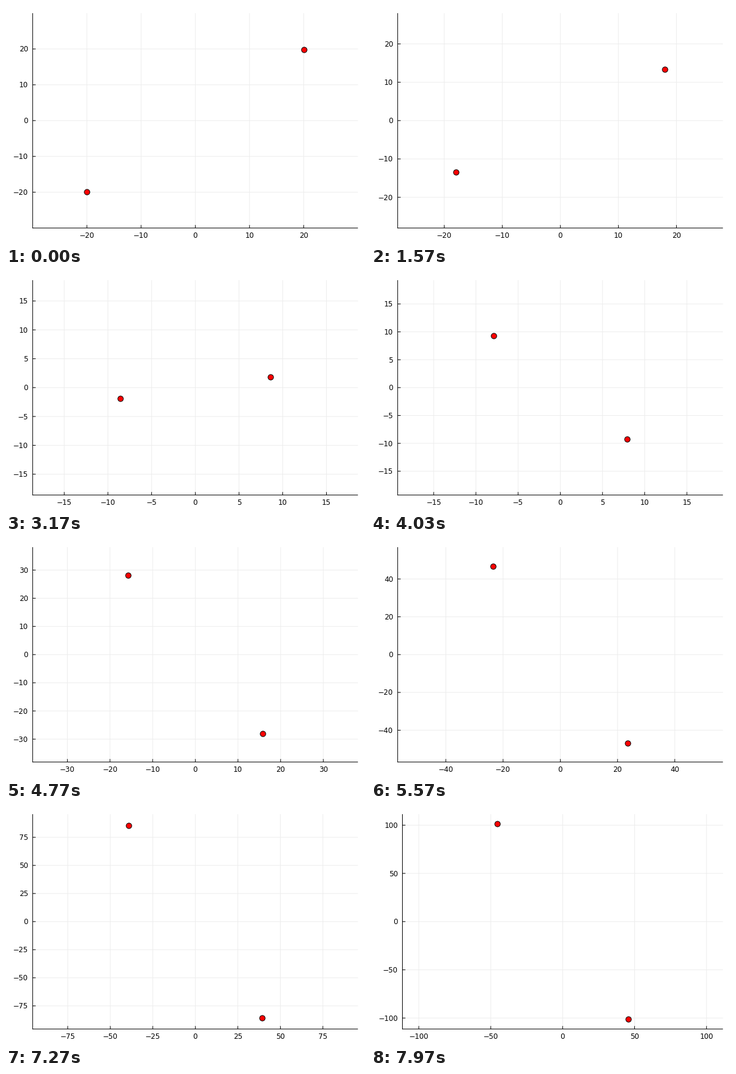
Animation of 600x400 px, one loop 8000 ms. Source, as a matplotlib script:

```python
import math

import matplotlib.pyplot as plt
from matplotlib.animation import FuncAnimation

W, H, DPI = 600, 400, 100
FRAMES, LOOP = 240, 8000
PX = 72 / DPI                       # one pixel in points
TOP, BOTTOM, RIGHT = 12.0, 371.6, 588.2
G = 6.67
STEPS = [(1, 1.0), (5, 0.9), (2, 0.7), (2.5, 0.5), (3, 0.2)]

plt.rcParams["font.family"] = "DejaVu Sans"
fig = plt.figure(figsize=(W / DPI, H / DPI), dpi=DPI, facecolor="white")
ax = fig.add_axes([0, 0, 1, 1])


def orbit(count):
    """Path of one of two equal masses; the other mirrors it in the origin."""
    x, y, vx, vy = 20.0, 20.0, 0.0, -0.1
    path = []
    for _ in range(count):
        pull = -G / (4 * math.hypot(x, y) ** 3)
        gx, gy = pull * x, pull * y
        x, y = x + vx + gx / 2, y + vy + gy / 2
        vx, vy = vx + gx, vy + gy
        path.append((x, y))
    return path


def tick_step(lim):
    """Pick the step with the best mix of count, coverage and roundness."""
    best, choice = -1, 1
    for power in (0, 1, 2):
        for base, nice in STEPS:
            step = base * 10 ** power
            count = 2 * math.floor(lim / step) + 1
            if count < 4:
                continue
            density = max(0, 1 - abs(count - 5) / 5)
            cover = 1.5 * lim / (math.ceil(lim / step) * step)
            score = density / 4 + cover / 3 + nice / 4
            if score > best:
                best, choice = score, step
    return choice


def line(xs, ys, color="black", width=1.0):
    ax.plot(xs, ys, color=color, lw=width * PX, snap=False,
            solid_capstyle="butt")


def label(x, y, value, align):
    ax.text(x, y, f"{value:g}".replace("-", "\u2212"), ha=align,
            va="baseline", fontsize=12 * PX, color="black")


PATH = orbit(FRAMES)


def draw(n):
    ax.clear()
    ax.set_xlim(0, W)
    ax.set_ylim(H, 0)
    ax.axis("off")

    x, y = PATH[n]
    lim = max(abs(x), abs(y)) + 10
    step = tick_step(lim)
    reach = math.floor(lim / step)
    ticks = [i * step for i in range(-reach, reach + 1)]
    left = 52.5 if ticks[-1] >= 100 else 44.6

    def sx(v):
        return left + (v + lim) / (2 * lim) * (RIGHT - left)

    def sy(v):
        return BOTTOM - (v + lim) / (2 * lim) * (BOTTOM - TOP)

    for t in ticks:
        line([sx(t)] * 2, [TOP, BOTTOM], "#ededed")
        line([left, RIGHT], [sy(t)] * 2, "#ededed")
    line([left] * 2, [TOP, BOTTOM + 0.5])
    line([left - 0.5, RIGHT], [BOTTOM] * 2)
    for t in ticks:
        line([sx(t)] * 2, [BOTTOM, BOTTOM - 5])
        line([left, left + 5], [sy(t)] * 2)
        label(sx(t), 387.8, t, "center")
        label(left - 7.6, sy(t) + 4.4, t, "right")

    ax.plot([sx(x), sx(-x)], [sy(y), sy(-y)], "o", ms=9.2 * PX, mfc="red",
            mec="black", mew=PX, snap=False)
    return []


anim = FuncAnimation(fig, draw, frames=FRAMES, init_func=lambda: [],
                     interval=LOOP / FRAMES, repeat=True, repeat_delay=0)
plt.show()
```
